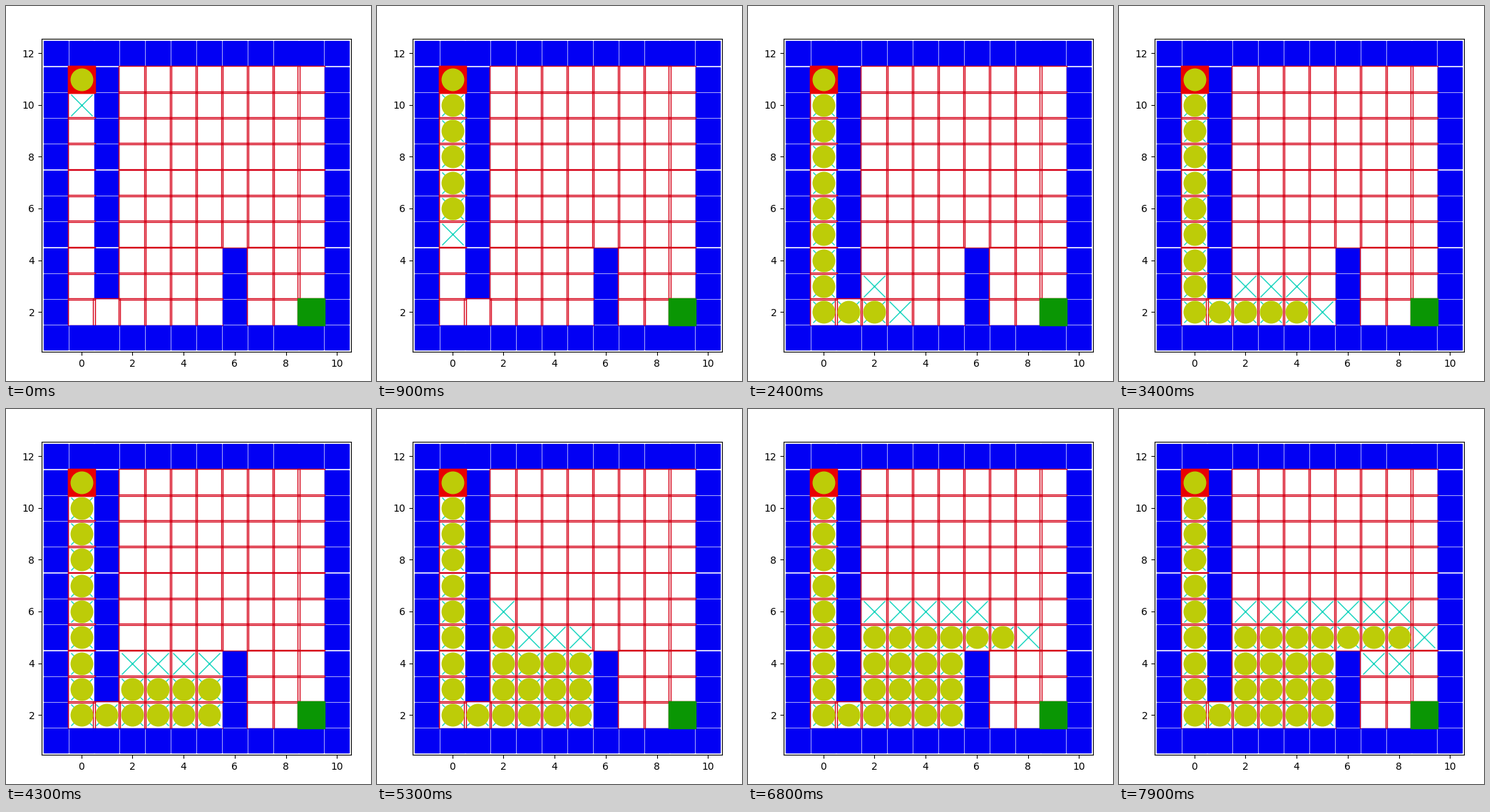
A matplotlib script for the animation above (8000 ms loop, 512 px wide and 526 px high).

```python
import matplotlib.pyplot as plt
from matplotlib.animation import FuncAnimation

W, H, DPI = 512, 526, 100
FRAMES, FRAME_MS = 80, 100
STEP_MS, LEAD_MS = 209.5, 150

BLUE, RED, GREEN = "#0200f4", "#e90002", "#0a9604"
YELLOW, CYAN, OUTLINE = "#bdcc08", "#10d3bd", "#d60016"

START, GOAL = (0, 11), (9, 2)
COLS, ROWS = range(-1, 11), range(1, 13)
WALLS = {(x, y) for x in COLS for y in ROWS if x in (-1, 10) or y in (1, 12)}
WALLS |= {(1, y) for y in range(3, 12)} | {(6, y) for y in range(2, 5)}


def search():
    """A* from START to GOAL: list of (expanded cell, discovered cell)."""
    cost = {START: 0}
    queue, steps = [START], []

    def estimate(cell):
        return cost[cell] + abs(cell[0] - GOAL[0]) + abs(cell[1] - GOAL[1])

    while queue:
        cell = min(queue, key=estimate)
        if cell == GOAL:
            break
        queue.remove(cell)
        for dx, dy in ((1, 0), (0, 1), (-1, 0), (0, -1)):
            near = (cell[0] + dx, cell[1] + dy)
            if near not in WALLS and near not in cost:
                cost[near] = cost[cell] + 1
                queue.append(near)
                steps.append((cell, near))
    return steps


fig = plt.figure(figsize=(W / DPI, H / DPI), dpi=DPI, facecolor="white")
ax = fig.add_axes([50 / W, 40.7 / H, 434 / W, 438.9 / H])
ax.set_xlim(-1.55, 10.55)
ax.set_ylim(0.45, 12.55)
ax.set_xticks(range(0, 11, 2))
ax.set_yticks(range(2, 13, 2))


def marker(cell, shape, color, size, **style):
    return ax.plot([cell[0]], [cell[1]], shape, color=color, ms=size, **style)[0]


# Drawn from the top left, so each cell overlaps the ones above and before it
for y in reversed(ROWS):
    for x in COLS:
        if (x, y) in WALLS:
            marker((x, y), "s", BLUE, 25)
        else:
            marker((x, y), "s", OUTLINE, 27, fillstyle="none")

marker(START, "s", RED, 27)
marker(GOAL, "s", GREEN, 27)

steps = search()
found = marker(START, "x", CYAN, 22)
visited = marker(START, "o", YELLOW, 22)


def update(i):
    count = 1 + int((i * FRAME_MS + LEAD_MS) / STEP_MS)
    expanded, discovered = zip(*steps[:count])
    found.set_data(*zip(*discovered))
    visited.set_data(*zip(*dict.fromkeys(expanded)))
    return found, visited


anim = FuncAnimation(fig, update, frames=FRAMES, interval=FRAME_MS, repeat=True)
plt.show()
```
